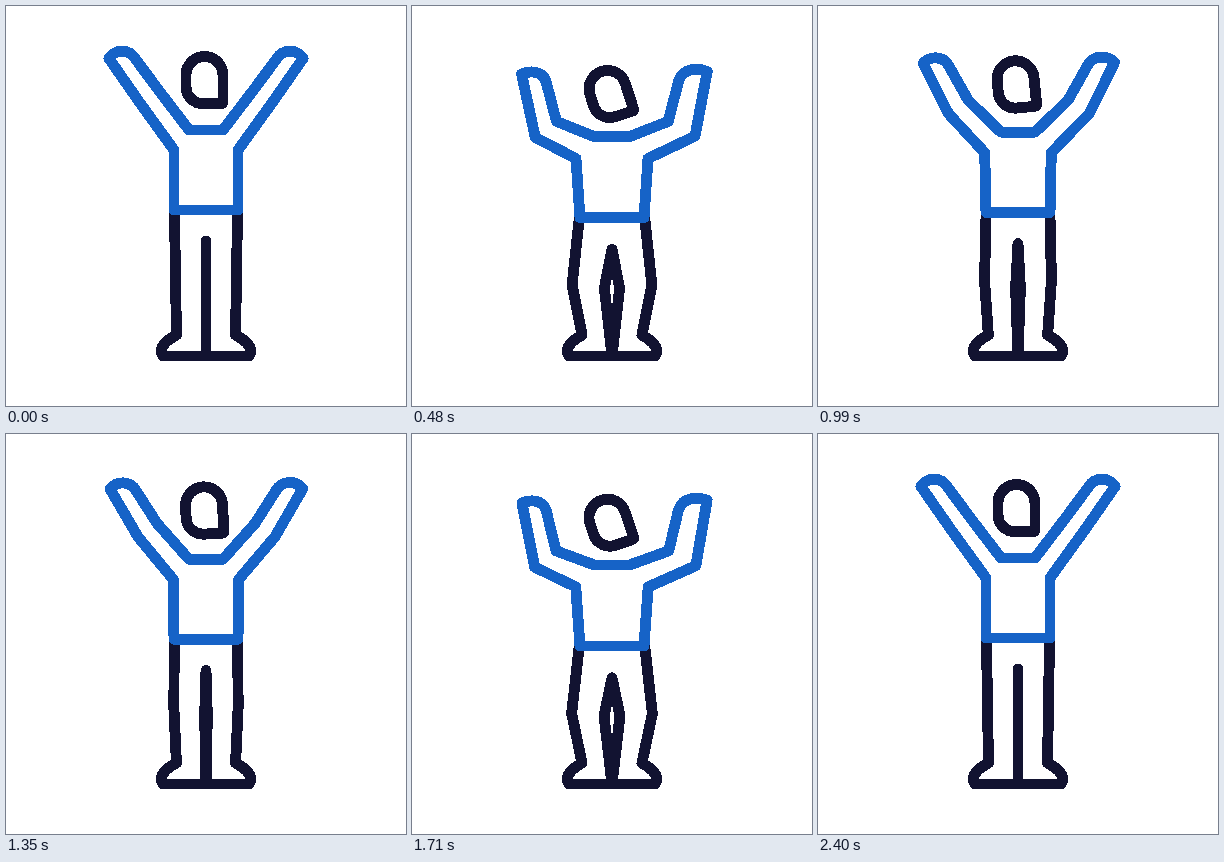
Animation, 400 px wide and 400 px high, one loop 2.43 s. Source, as an HTML page:

```html
<!DOCTYPE html>
<html lang="en">
<head>
<meta charset="utf-8">
<title>Cheering figure</title>
<style>
  html, body { margin: 0; width: 100%; height: 100%; overflow: hidden; background: #fff; }
  svg { display: block; width: 100vw; height: 100vh; }
</style>
</head>
<body>
<svg viewBox="0 0 400 400" fill="none" stroke-width="10.9" stroke-linecap="round" stroke-linejoin="round" shape-rendering="crispEdges">
  <g stroke="#121331">
    <path id="leg"/>
    <use href="#leg" transform="translate(400) scale(-1 1)"/>
    <path id="head" d="M18.5 22V-5A18.5 18.5 0 0 0 -18.5 -5V6.7A17 17 0 0 0 -1.5 23.7H16.8Q18.5 23.7 18.5 22Z"/>
  </g>
  <path id="shirt" stroke="#1663c7"/>
</svg>
<script>
  const LOOP = 2430, STEP = 30, HALF = 600;

  // Each pair holds the stretched pose and the bent pose.
  const leg = [
    "M168.5 206L169.5 272L170.5 329C163 333 155 338 155.3 346L157 350L200 350L200 282L200 235",
    "M167 214L159 280L170 329C163 333 155 338 155.3 346L157 350L200 350L191.5 282L200 244.5"
  ];
  const shirt = [
    "M168 204L168 144L134 97L103 52.5C109 43 123 42.5 129.5 53L152.5 84L183 124" +
    "L217 124L247.5 84L270.5 53C277 42.5 291 43 297 52.5L266 97L232 144L232 204Z",
    "M168 212.5L163.5 153.5L122 135.5L110.4 70C119 67 131 67 134.5 78L143.5 119L182.5 131.5" +
    "L217.5 131.5L257.3 119L266.3 77C271 64 285 64 295 67L285 134L236.5 153.5L232 212.5Z"
  ];

  const $ = id => document.getElementById(id);
  const lerp = (a, b, k) => a + (b - a) * k;
  const number = /[\d.]+/g;

  function morph([from, to], k) {
    const ends = to.match(number);
    let i = 0;
    return from.replace(number, n => lerp(+n, +ends[i++], k).toFixed(2));
  }

  function draw(ms) {
    const t = Math.floor((ms % LOOP) / STEP) * STEP;
    const phase = (t / HALF) % 2;
    const u = phase < 1 ? phase : 2 - phase;
    const k = u * u * (3 - 2 * u);
    $("leg").setAttribute("d", morph(leg, k));
    $("shirt").setAttribute("d", morph(shirt, k));
    $("head").setAttribute("transform",
      `translate(${lerp(198.5, 197, k)} ${lerp(74, 89.3, k)}) rotate(${-20 * k})`);
  }

  const start = performance.now();
  function tick() {
    draw(performance.now() - start);
    requestAnimationFrame(tick);
  }
  tick();
</script>
</body>
</html>
```
